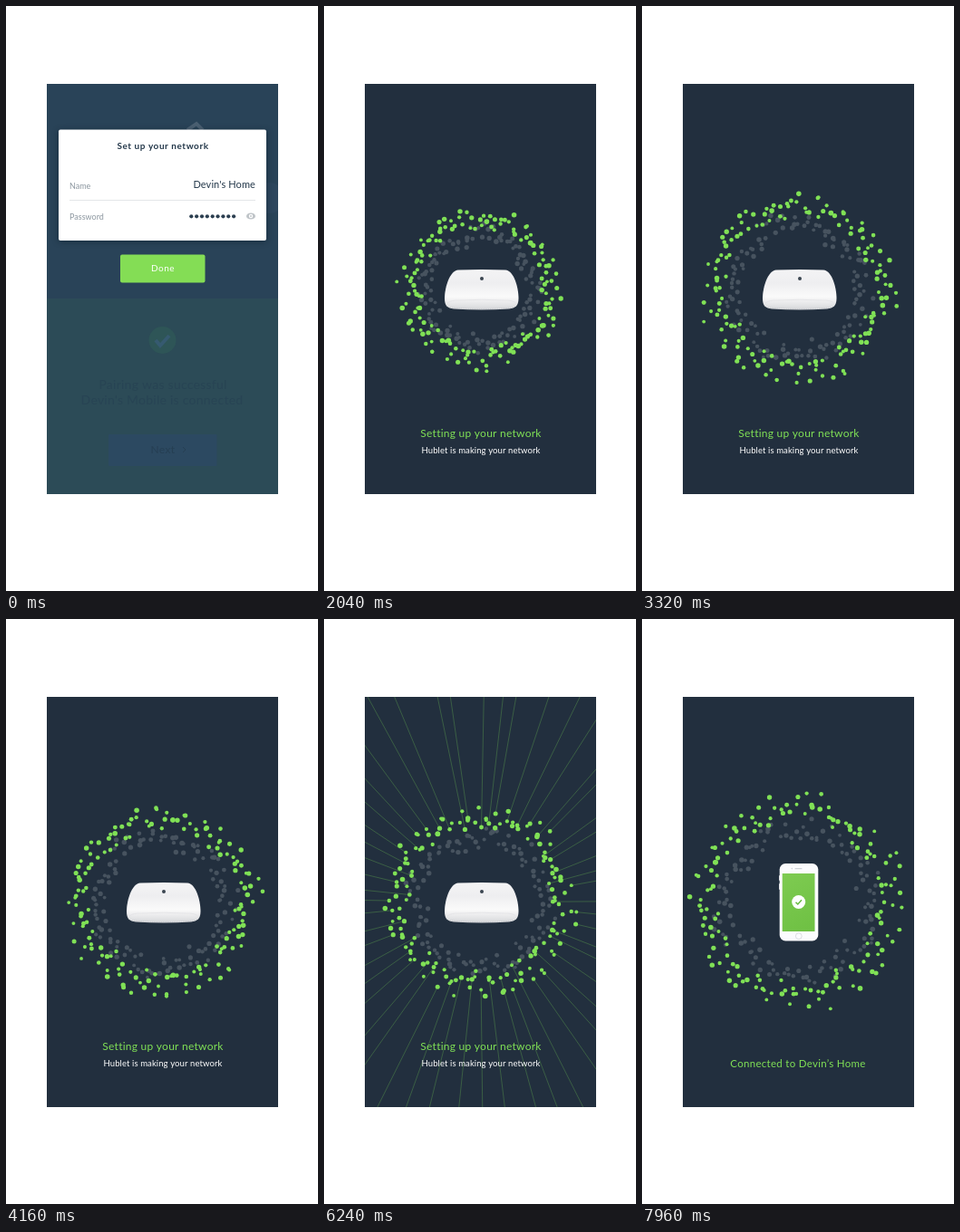
An HTML page with a canvas that plays this animation: 344x646 px, repeating every 8000 ms.

```html
<!DOCTYPE html>
<html lang="en">
<head>
<meta charset="utf-8">
<title>Network setup</title>
<style>
  html, body { margin: 0; width: 100%; height: 100%; overflow: hidden; background: #fff; }
  canvas { display: block; width: 344px; height: 646px; }
</style>
</head>
<body>
<canvas id="stage"></canvas>
<script>
const LOOP = 8000, W = 344, H = 646;
const CX = 172, CY = 312.5;
const GREEN = '#80e156', NAVY = '#222f3e', GREY = '#47535f';
const FONT = 'Lato, "Open Sans", sans-serif';

const canvas = document.getElementById('stage');
const ctx = canvas.getContext('2d');
const ratio = window.devicePixelRatio || 1;
canvas.width = W * ratio;
canvas.height = H * ratio;

// Keyframes are [time, value] pairs.
const SCALE = [[1480, .35], [2040, .84], [2600, .965], [3300, 1], [6880, 1],
               [7040, .955], [7160, .93], [7560, 1.14], [7960, 1.12]];
const DEVICE_IN = [[1280, 0], [1680, 1]];
const DEVICE_SIZE = [[1280, .7], [1680, 1], [6920, 1], [7040, .88], [7240, 0]];
const PHONE_SIZE = [[7200, 0], [7440, 1.08], [7600, 1]];
const TEXT_IN = [[1640, 0], [1960, 1], [7040, 1], [7200, 0]];
const TEXT_SIZE = [[6920, 1], [7040, .935], [7240, .7]];
const DONE_IN = [[7240, 0], [7560, 1]];
const DOTS_IN = [[1480, 0], [1800, 1]];

function tween(t, keys) {
  if (t <= keys[0][0]) return keys[0][1];
  for (let i = 1; i < keys.length; i++) {
    const [t0, a] = keys[i - 1], [t1, b] = keys[i];
    if (t < t1) {
      const p = (t - t0) / (t1 - t0);
      return a + (b - a) * p * p * (3 - 2 * p);
    }
  }
  return keys[keys.length - 1][1];
}

const progress = (t, from, to) => Math.min(1, Math.max(0, (t - from) / (to - from)));

function seeded(seed) {
  return () => (seed = seed * 16807 % 2147483647) / 2147483647;
}

function makeDots(count, radius, spread, seed) {
  const rand = seeded(seed);
  return Array.from({ length: count }, (_, i) => ({
    angle: (i + rand() * 1.8) / count * Math.PI * 2,
    radius: radius + spread * (rand() + rand() - 1),
    size: 1.9 + rand() * .9,
    phase: rand() * Math.PI * 2
  }));
}

const greenDots = makeDots(155, 93, 19, 4711);
const greyDots = makeDots(120, 72, 14, 9203);

function group(alpha, scale, x, y, draw) {
  if (alpha <= 0 || scale <= 0) return;
  ctx.save();
  ctx.globalAlpha *= alpha;
  ctx.translate(x, y);
  ctx.scale(scale, scale);
  ctx.translate(-x, -y);
  draw();
  ctx.restore();
}

function box(x, y, w, h, r, fill) {
  ctx.beginPath();
  ctx.roundRect(x, y, w, h, r);
  ctx.fillStyle = fill;
  ctx.fill();
}

function disc(x, y, r, fill) {
  ctx.beginPath();
  ctx.arc(x, y, r, 0, Math.PI * 2);
  ctx.fillStyle = fill;
  ctx.fill();
}

function line(points, color, width) {
  ctx.beginPath();
  points.forEach(([x, y]) => ctx.lineTo(x, y));
  ctx.strokeStyle = color;
  ctx.lineWidth = width;
  ctx.stroke();
}

function label(text, x, y, size, color, { align = 'center', weight = 400, spacing = 0 } = {}) {
  ctx.font = `${weight} ${size}px ${FONT}`;
  ctx.letterSpacing = spacing + 'px';
  ctx.textAlign = align;
  ctx.fillStyle = color;
  ctx.fillText(text, x, y);
}

function shade(x0, y0, x1, y1, ...colors) {
  const g = ctx.createLinearGradient(x0, y0, x1, y1);
  colors.forEach((c, i) => g.addColorStop(i / (colors.length - 1), c));
  return g;
}

function drawPairing() {
  box(45, 86, 255, 237, 0, '#294358');
  box(45, 323, 255, 216, 0, '#2c4b57');
  line([[200, 137], [210, 130], [217, 137]], '#4b6072', 4);
  disc(290, 212, 17, '#2d465d');
  disc(172.5, 369, 15, '#2e5557');
  line([[165, 369], [170, 375], [180, 364]], '#365a70', 4);
  label('Pairing was successful', 173, 423, 14, '#284454', { spacing: .25 });
  label("Devin's Mobile is connected", 172, 440, 14, '#284454', { spacing: .25 });
  box(113, 473, 119.5, 35, 1, '#2c4961');
  label('Next', 173, 494, 12, '#263f53', { spacing: .4 });
  line([[195, 487], [198, 490], [195, 493]], '#263f53', 1);
}

function drawDialog() {
  ctx.save();
  ctx.shadowColor = 'rgba(10, 25, 38, .55)';
  ctx.shadowBlur = 6 * ratio;
  ctx.shadowOffsetY = ratio;
  box(58, 136.5, 229, 122.5, 2, '#fff');
  ctx.restore();
  label('Set up your network', 173, 158, 10, '#24384a', { weight: 700, spacing: .55 });
  label('Name', 70, 202, 9, '#8b969f', { align: 'left' });
  label("Devin's Home", 275, 200.5, 11, '#24384a', { align: 'right', spacing: .1 });
  line([[70, 214.5], [275, 214.5]], '#e4e6e8', 1);
  label('Password', 70, 236, 9, '#8b969f', { align: 'left' });
  for (let i = 0; i < 9; i++) disc(204.3 + i * 5.85, 232.3, 2.1, '#2c3f50');
  ctx.beginPath();
  ctx.ellipse(270, 232, 5, 3.6, 0, 0, Math.PI * 2);
  ctx.fillStyle = '#bfc4c8';
  ctx.fill();
  disc(270, 232, 2.2, '#fff');
  disc(270, 232, 1, '#bfc4c8');
  box(126, 274.5, 93.5, 31, 2, '#84dd55');
  label('Done', 173, 293, 10, '#fff', { spacing: .5 });
}

function drawDevice() {
  ctx.beginPath();
  ctx.moveTo(148, 291.5);
  ctx.quadraticCurveTo(174, 290.5, 200, 291.5);
  ctx.bezierCurveTo(209, 292, 214.5, 310, 214.5, 323);
  ctx.bezierCurveTo(214.5, 331, 211, 333.5, 204, 334.5);
  ctx.quadraticCurveTo(174, 336.5, 143, 334.5);
  ctx.bezierCurveTo(136, 333.5, 133, 331, 133, 323);
  ctx.bezierCurveTo(133, 310, 139, 292, 148, 291.5);
  ctx.fillStyle = shade(0, 291, 0, 336, '#f4f4f5', '#eeeef0', '#fafafa', '#d5d6d9');
  ctx.fill();
  ctx.beginPath();
  ctx.moveTo(136, 328);
  ctx.quadraticCurveTo(140, 324.5, 150, 325);
  ctx.quadraticCurveTo(174, 323.5, 198, 325);
  ctx.quadraticCurveTo(208, 324.5, 211.5, 328);
  ctx.strokeStyle = '#e2e3e5';
  ctx.lineWidth = .8;
  ctx.stroke();
  ctx.beginPath();
  ctx.moveTo(139, 333);
  ctx.quadraticCurveTo(174, 336, 208, 333);
  ctx.strokeStyle = '#babdc2';
  ctx.setLineDash([1, 1]);
  ctx.stroke();
  disc(174, 301, 2, '#3b4651');
}

function drawPhone() {
  box(151, 283, 2, 6, 1, '#d9dce0');
  box(151, 292, 2, 7, 1, '#d9dce0');
  box(151.7, 270, 42.6, 85.5, 6.5, '#fbfbfd');
  box(154.7, 281, 35.8, 64, 0, shade(155, 281, 190, 345, '#7ecb51', '#6ec043'));
  box(168.5, 275, 8, 1.3, .6, '#cfd2d7');
  disc(165.3, 275.6, .8, '#cfd2d7');
  ctx.beginPath();
  ctx.arc(172.8, 350.2, 3.4, 0, Math.PI * 2);
  ctx.strokeStyle = '#d3d6db';
  ctx.lineWidth = .8;
  ctx.stroke();
  disc(172.7, 312.5, 7.5, '#fff');
  line([[169.5, 312.7], [171.8, 315], [176, 310.3]], '#67bb3f', 1.5);
}

function place(dot, t, scale) {
  const angle = dot.angle - (t - 2000) / 1000 * .33;
  const radius = scale * (dot.radius + 1.6 * Math.sin(t / 900 + dot.phase));
  return { angle, radius, x: CX + radius * Math.cos(angle), y: CY + radius * Math.sin(angle) };
}

function drawRays(t, scale) {
  if (t < 5160 || t > 7620) return;
  const head = 260 * progress(t, 5160, 5960) ** 2;
  const tail = 260 * progress(t, 7100, 7620) ** 2;
  ctx.save();
  ctx.globalAlpha = .4 * (1 - progress(t, 7300, 7620));
  greenDots.forEach((dot, i) => {
    if (i % 3) return;
    const { angle, radius } = place(dot, t, scale);
    const at = r => [CX + r * Math.cos(angle), CY + r * Math.sin(angle)];
    line([at(radius + tail), at(radius + head)], '#6fc352', .8);
  });
  ctx.restore();
}

function drawRing(dots, t, scale, color) {
  for (const dot of dots) {
    const { x, y } = place(dot, t, scale);
    disc(x, y, dot.size, color);
  }
}

function render(t) {
  ctx.setTransform(ratio, 0, 0, ratio, 0, 0);
  ctx.fillStyle = '#fff';
  ctx.fillRect(0, 0, W, H);
  ctx.save();
  ctx.beginPath();
  ctx.rect(45, 86, 255, 453);
  ctx.clip();
  box(45, 86, 255, 453, 0, NAVY);

  group(1 - progress(t, 960, 1720), 1, CX, CY, drawPairing);
  const leave = progress(t, 960, 1320);
  group(1 - leave, 1 - .08 * leave * leave, 172.5, 220, drawDialog);

  const scale = tween(t, SCALE);
  group(tween(t, DOTS_IN), 1, CX, CY, () => {
    drawRays(t, scale);
    drawRing(greyDots, t, scale, GREY);
    drawRing(greenDots, t, scale, GREEN);
  });

  group(tween(t, DEVICE_IN), tween(t, DEVICE_SIZE), 173.7, 313.5, drawDevice);
  group(1, tween(t, PHONE_SIZE), 173, 312.5, drawPhone);

  group(tween(t, TEXT_IN), tween(t, TEXT_SIZE), 173, 482, () => {
    label('Setting up your network', 173, 476, 12, GREEN, { spacing: .25 });
    label('Hublet is making your network', 173, 493.5, 9.5, '#fff', { spacing: .1 });
  });
  group(tween(t, DONE_IN), 1, CX, 491, () => {
    label('Connected to Devin’s Home', 172, 495, 11.5, GREEN, { spacing: .3 });
  });
  ctx.restore();
}

const start = performance.now();
function frame() {
  render((performance.now() - start) % LOOP);
  requestAnimationFrame(frame);
}
frame();
</script>
</body>
</html>
```
